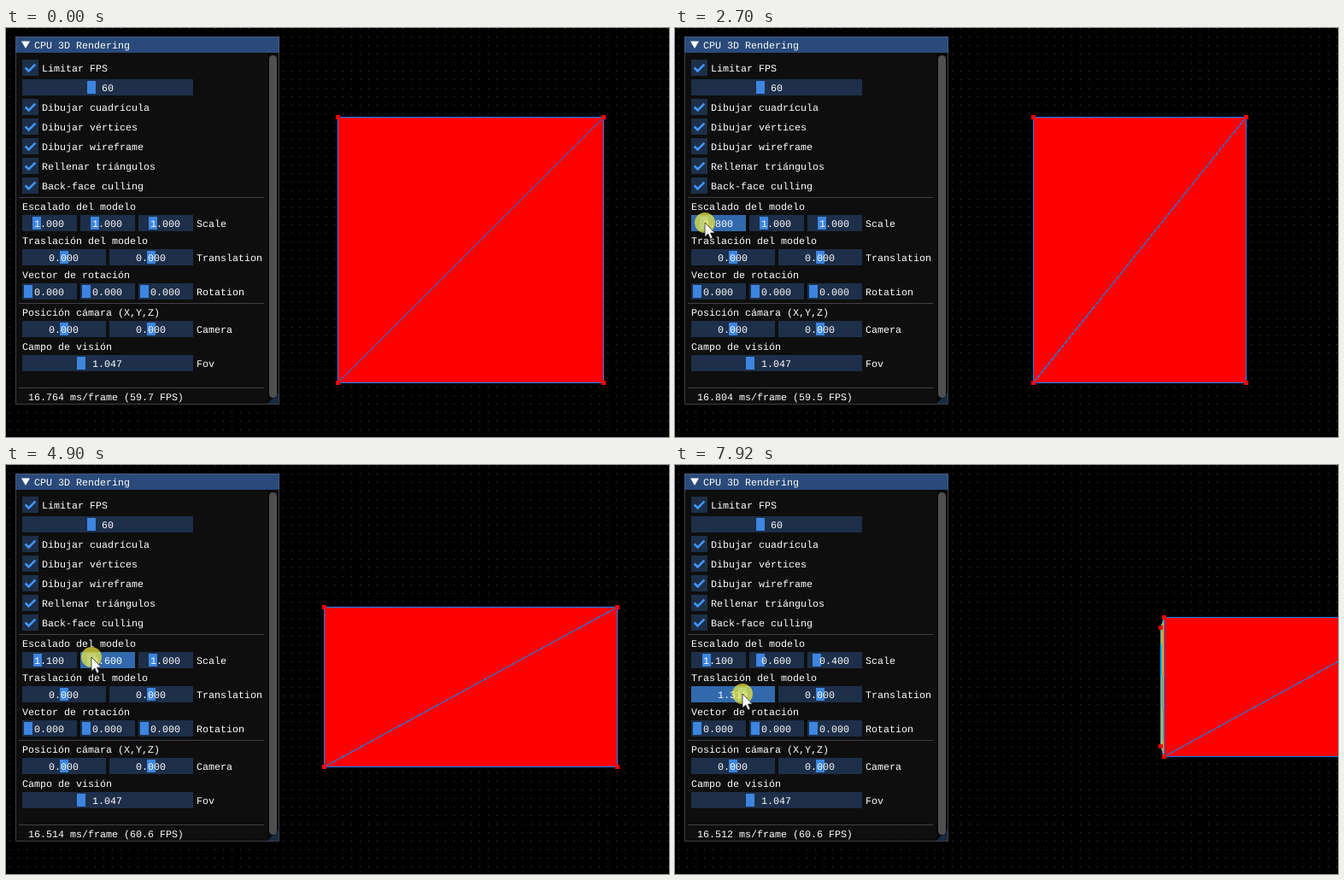
An HTML page for the animation above (8 s loop, 776 by 479 pixels).

```html
<!DOCTYPE html>
<html lang="es">
<head>
<meta charset="utf-8">
<title>CPU 3D Rendering</title>
<style>
html, body { margin: 0; width: 100%; height: 100%; overflow: hidden; background: #000; }
svg { display: block; width: 776px; height: 479px; }
text { font: 11.667px "Liberation Mono", monospace; fill: #fff; white-space: pre; text-rendering: geometricPrecision; }
</style>
</head>
<body>
<svg viewBox="0 0 776 479" xmlns="http://www.w3.org/2000/svg">
  <defs>
    <pattern id="dots" x="4" y="0" width="10" height="10" patternUnits="userSpaceOnUse">
      <rect width="1" height="1" fill="#444"/>
    </pattern>
  </defs>
  <rect width="776" height="479"/>
  <rect width="776" height="479" fill="url(#dots)" shape-rendering="crispEdges"/>
  <g id="model" shape-rendering="crispEdges"></g>
  <g id="panel"></g>
  <circle id="press" r="12" fill="#f4ec3c" opacity=".7"/>
  <path id="cursor" d="M0 0V16.5L3.8 13L6.3 18.8L9 17.6L6.5 12H11.6Z" fill="#fff" stroke="#222" stroke-width=".8"/>
</svg>
<script>
const LOOP = 8000, STEP = 81.65;
const CX = 544, CY = 260, FOCAL = 623.5, CAM = 5;
const IDLE = '#1d2f49', HOVER = '#23456d', ACTIVE = '#3169ac';
const GRAB = '#3d85e0', GRAB_ON = '#4296fa', WIRE = '#0084ff';

const $ = id => document.getElementById(id);
const mix = (a, b, u) => a + (b - a) * u;

function set(el, attrs) {
  for (const k in attrs) el.setAttribute(k, attrs[k]);
}
function add(parent, tag, attrs, label = '') {
  const el = document.createElementNS('http://www.w3.org/2000/svg', tag);
  set(el, attrs);
  el.textContent = label;
  return parent.appendChild(el);
}

// Panel
const panel = $('panel');
const rect = (x, y, width, height, fill, more) => add(panel, 'rect', { x, y, width, height, fill, ...more });
const text = (x, mid, label) => add(panel, 'text', { x, y: mid + 4 }, label);
const path = attrs => add(panel, 'path', attrs);
const rule = y => rect(15, y, 287, 1, '#3f3f48');

class Slider {
  constructor(x, y, w, min, max, value, digits = 3) {
    Object.assign(this, { x, y, w, min, max, digits });
    this.frame = rect(x, y, w, 19, IDLE);
    this.grab = rect(0, y + 2, 10, 15, GRAB);
    this.label = text(0, y + 10);
    this.show(value);
  }
  toX(v) {
    return this.x + 7 + (v - this.min) / (this.max - this.min) * (this.w - 14);
  }
  toValue(px) {
    const v = this.min + (px - this.x - 7) / (this.w - 14) * (this.max - this.min);
    return Math.round(v * 100) / 100;
  }
  show(v) {
    const s = v.toFixed(this.digits);
    set(this.grab, { x: Math.round(this.toX(v)) - 5 });
    set(this.label, { x: Math.floor(this.x + this.w / 2 - s.length * 3.5) });
    this.label.textContent = s;
  }
  paint(active, hover) {
    set(this.frame, { fill: active ? ACTIVE : hover ? HOVER : IDLE });
    set(this.grab, { fill: active ? GRAB_ON : GRAB });
  }
  hit(x, y) {
    return x >= this.x && x < this.x + this.w && y >= this.y && y < this.y + 19;
  }
}

function check(y, label) {
  rect(19, y, 19, 19, IDLE);
  path({ d: `M22.65 ${y + 9.5}l3.9 3.9l7.8 -7.8`, fill: 'none', stroke: GRAB_ON, 'stroke-width': 2.6 });
  text(42, y + 10, label);
}

// Heading, then n equal sliders and their name
function group(y, heading, name, n, min, max, value) {
  const w = (204 - 4 * n) / n;
  text(19, y, heading);
  text(223, y + 20, name);
  return Array.from({ length: n }, (_, i) => new Slider(19 + i * (w + 4), y + 10, w, min, max, value));
}

rect(11, 10, 309, 431, '#0f0f0f', { opacity: .94 });
rect(306, 29, 13, 411, '#090909');
path({ d: 'M319 427V440H306Z', fill: '#192a3e' });
rect(308, 32, 9, 401, '#4f4f4f', { rx: 4.5 });
rect(11, 10, 309, 19, '#294a7a');
rect(11.5, 10.5, 308, 430, 'none', { stroke: '#6e6e80', 'stroke-opacity': .5 });
path({ d: 'M18 15.5H28L23 24Z', fill: '#fff' });
text(33, 20, 'CPU 3D Rendering');

check(37, 'Limitar FPS');
new Slider(19, 60, 200, 0, 150, 60, 0);
['Dibujar cuadrícula', 'Dibujar vértices', 'Dibujar wireframe', 'Rellenar triángulos', 'Back-face culling']
  .forEach((label, i) => check(83 + i * 23, label));
rule(198);
const scale = group(209, 'Escalado del modelo', 'Scale', 3, 0, 5, 1);
const shift = group(249, 'Traslación del modelo', 'Translation', 2, -5, 5, 0);
const spin = group(289, 'Vector de rotación', 'Rotation', 3, 0, 2 * Math.PI, 0);
rule(322);
group(333, 'Posición cámara (X,Y,Z)', 'Camera', 2, -5, 5, 0);
group(373, 'Campo de visión', 'Fov', 1, 0, Math.PI, Math.PI / 3);
rule(421);
const stats = text(26, 432);

// Model
const [side, sideWire, front, wire, marks] = [
  { fill: '#ffa000' }, { fill: 'none', stroke: '#00b0ff' },
  { fill: '#f00' }, { fill: 'none', stroke: WIRE }, { fill: '#f00' }
].map(attrs => add($('model'), 'path', attrs));

// Screen box of the face at depth z
function face(sx, sy, tx, z) {
  const k = FOCAL / (CAM - z), px = v => Math.floor(v) + .5;
  return {
    l: px(CX + k * (tx - sx)), r: px(CX + k * (tx + sx)),
    t: px(CY - k * sy), b: px(CY + k * sy)
  };
}
const mark = (x, y) => `M${x - 2.5} ${y - 2.5}h5v5h-5z`;

function drawModel(sx, sy, sz, tx) {
  const { l, r, t, b } = face(sx, sy, tx, sz);
  const far = face(sx, sy, tx, -sz);
  const open = tx > sx;
  const box = `M${l} ${t}H${r}V${b}H${l}Z`;
  const quad = `M${l} ${t}L${far.l} ${far.t}V${far.b}L${l} ${b}Z`;
  set(side, { d: open ? quad : '' });
  set(sideWire, { d: open ? `${quad}M${l} ${b}L${far.l} ${far.t}` : '' });
  set(front, { d: box });
  set(wire, { d: `${box}M${l} ${b}L${r} ${t}` });
  set(marks, {
    d: mark(l, t) + mark(r, t) + mark(l, b) + mark(r, b) +
      (open ? mark(far.l, far.t) + mark(far.l, far.b) : '')
  });
}

// Motion, in steps: each drag lists [step, value] turning points
const ENTRY = { step: 11, x: 5, y: 306 };
const DRAGS = [
  { slider: scale[0], y: 228, to: 39, keys: [[17, 1], [20, .6], [25, 1.4], [32, .8], [38, 1.1]] },
  { slider: scale[1], y: 225, to: 61, keys: [[45, 1], [49, .7], [54, .9], [58, .6]] },
  { slider: scale[2], y: 228, to: 81, keys: [[68, 1], [71, .5], [76, .4]] },
  { slider: shift[0], y: 268, to: 99, keys: [[92, 0], [96, 1.31]] }
];
const FRAME_MS = [[0, 16.764], [13, 16.815], [27, 16.876], [33, 16.804], [50, 16.535], [72, 16.489], [97, 16.512]];

// Linear between [step, value] pairs, held at both ends
function follow(keys, i) {
  const n = keys.findIndex(([s]) => s > i);
  if (n < 1) return keys.at(n)[1];
  const [[s0, v0], [s1, v1]] = keys.slice(n - 1);
  return mix(v0, v1, (i - s0) / (s1 - s0));
}
const dragX = (d, i) => Math.round(d.slider.toX(follow(d.keys, i)));
const start = d => d.keys[0][0];

// Follow the current drag, or glide on to the next one
function pointer(i) {
  const n = DRAGS.findIndex(d => i < d.to), d = DRAGS[n], s = start(d);
  if (i >= s) return [dragX(d, i), d.y];
  const last = DRAGS[n - 1];
  const a = last ? { step: last.to, x: dragX(last, last.to), y: last.y } : ENTRY;
  const u = Math.sin(Math.max(0, i - a.step) / (s - a.step) * Math.PI / 2);
  return [Math.round(mix(a.x, dragX(d, s), u)), Math.round(mix(a.y, d.y, u))];
}

function draw(t) {
  const i = Math.floor((t + 12) / STEP);
  const [x, y] = pointer(i);
  const seen = i >= ENTRY.step;
  const drag = DRAGS.find(d => i >= start(d) && i < d.to);

  // Values trail the pointer by one step
  const values = DRAGS.map(d => {
    const v = d.slider.toValue(dragX(d, i - 1));
    d.slider.show(v);
    return v;
  });
  for (const s of [...scale, ...shift, ...spin])
    s.paint(drag && drag.slider === s, seen && !drag && s.hit(x, y));
  drawModel(...values);

  const ms = follow(FRAME_MS, i);
  stats.textContent = `${ms.toFixed(3)} ms/frame (${(1000 / ms).toFixed(1)} FPS)`;

  set($('cursor'), { transform: `translate(${x} ${y})`, visibility: seen ? 'visible' : 'hidden' });
  set($('press'), { cx: x, cy: y, visibility: drag ? 'visible' : 'hidden' });
}

const began = performance.now();
function tick() {
  draw((performance.now() - began) % LOOP);
  requestAnimationFrame(tick);
}
tick();
</script>
</body>
</html>
```
